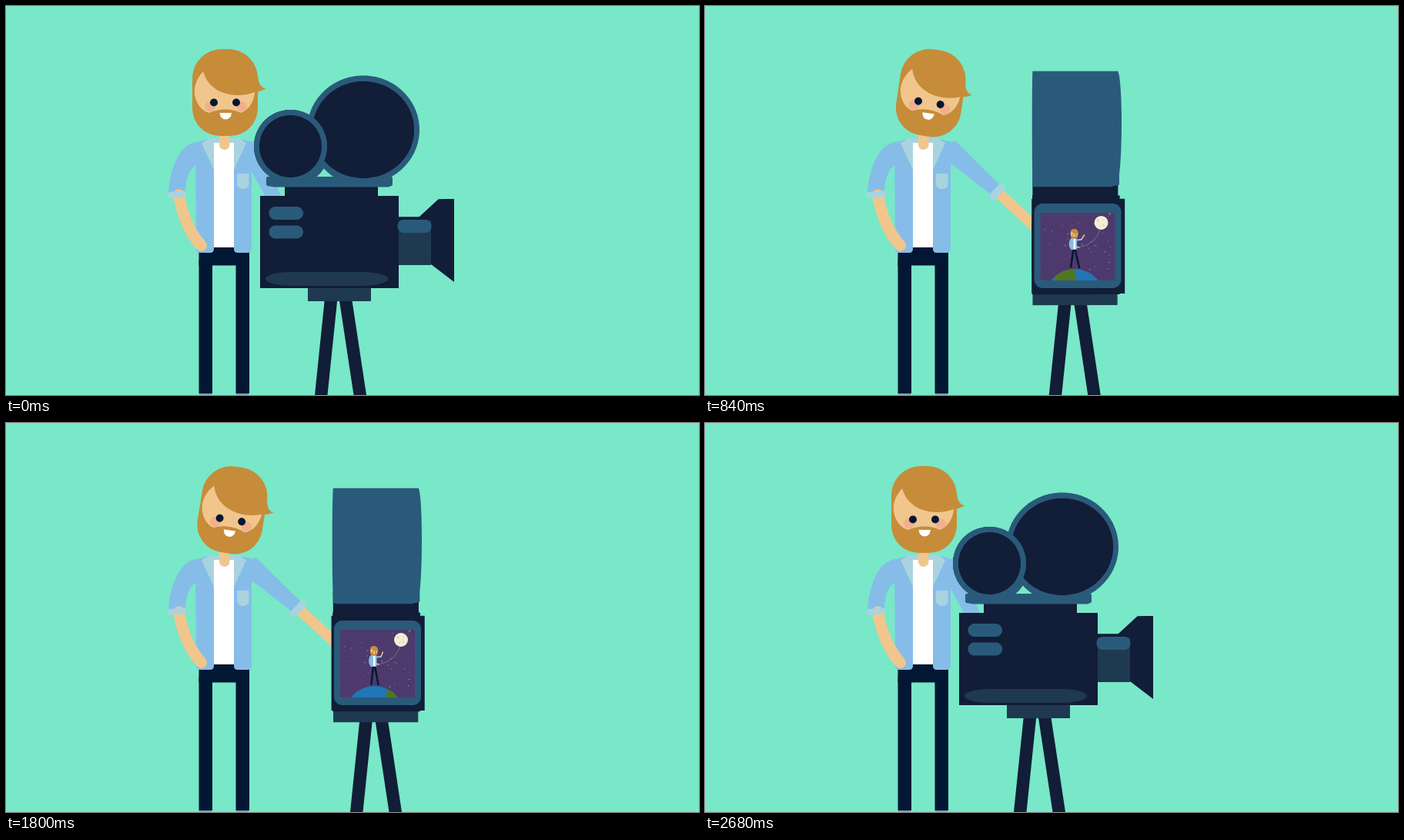
Write an HTML page with a canvas that moves like this. It is 900 px wide and 506 px high and loops after 2720 ms.

```html
<!DOCTYPE html>
<html lang="en">
<head>
<meta charset="utf-8">
<title>Film camera</title>
<style>
html, body { margin: 0; width: 100%; height: 100%; overflow: hidden; background: #78e8c8; }
canvas { display: block; width: 900px; height: 506px; }
</style>
</head>
<body>
<canvas id="stage" width="900" height="506"></canvas>
<script>
const ctx = document.getElementById('stage').getContext('2d');
const LOOP = 2720, TAU = Math.PI * 2;
const MINT = '#78e8c8', SKIN = '#f0c68d', HAIR = '#c68c39', DENIM = '#86bde8', PALE = '#a9d3df',
  NAVY = '#021733', DARK = '#121d38', BLUE = '#2a5a7a', TEAL = '#1f3a50';

const ease = (t, start, end) => {
  const x = Math.min(1, Math.max(0, (t - start) / (end - start)));
  return x * x * (3 - 2 * x);
};

// ---- 2D helpers ----
function shape(d, color) {
  ctx.fillStyle = color;
  ctx.fill(new Path2D(d));
}
function line(d, color, width, cap = 'round') {
  ctx.strokeStyle = color;
  ctx.lineWidth = width;
  ctx.lineCap = cap;
  ctx.stroke(new Path2D(d));
}
function rect(x, y, w, h, color, radii = 0) {
  ctx.fillStyle = color;
  ctx.beginPath();
  ctx.roundRect(x, y, w, h, radii);
  ctx.fill();
}
function oval(x, y, rx, ry, color) {
  ctx.fillStyle = color;
  ctx.beginPath();
  ctx.ellipse(x, y, rx, ry, 0, 0, TAU);
  ctx.fill();
}
function trace(points) {
  ctx.beginPath();
  points.forEach(p => ctx.lineTo(...p));
  ctx.closePath();
}
function polygon(points, color) {
  ctx.fillStyle = color;
  trace(points);
  ctx.fill();
}

// ---- 3D helpers: (x, y) as in the side view, w is depth ----
const ZOOM = 1250, PIVOT = 426, DEPTH = 106, CX = 450, CY = 253, FRONT = 582;
let cos = 1, sin = 0;
function project(x, y, w = 0) {
  const u = x - PIVOT;
  const k = ZOOM / (ZOOM - u * sin - w * cos);
  return [CX + (PIVOT + u * cos - w * sin - CX) * k, CY + (y - CY) * k];
}
// Point on the front plane, given by its place in the front view.
function front(x, y) {
  const k = ZOOM / (ZOOM - FRONT + PIVOT);
  return project(FRONT, CY + (y - CY) / k, PIVOT - CX - (x - CX) / k);
}
// Outline of a rectangle with elliptic corners.
function pill(x0, y0, x1, y1, rx, ry = rx) {
  return Array.from({ length: 64 }, (_, i) => {
    const a = (i + .5) / 64 * TAU, c = Math.cos(a), s = Math.sin(a);
    return [(x0 + x1) / 2 + Math.sign(c) * ((x1 - x0) / 2 - rx) + c * rx,
            (y0 + y1) / 2 + Math.sign(s) * ((y1 - y0) / 2 - ry) + s * ry];
  });
}
const disc = (x, y, rx, ry) => pill(x - rx, y - ry, x + rx, y + ry, rx, ry);
const box = (x0, y0, x1, y1) => [[x0, y0], [x1, y0], [x1, y1], [x0, y1]];

function hull(points) {
  const half = list => {
    const out = [];
    for (const p of list) {
      while (out.length > 1) {
        const [a, b] = out.slice(-2);
        if ((b[0] - a[0]) * (p[1] - a[1]) - (b[1] - a[1]) * (p[0] - a[0]) > 0) break;
        out.pop();
      }
      out.push(p);
    }
    return out.slice(0, -1);
  };
  points.sort((a, b) => a[0] - b[0] || a[1] - b[1]);
  return [...half(points), ...half([...points].reverse())];
}
function prism(points, color) {
  polygon(hull(points.flatMap(([x, y]) => [project(x, y), project(x, y, -DEPTH)])), color);
}
function sideFace(points, color) {
  if (ZOOM * cos > 24 * sin) polygon(points.map(p => project(...p)), color);
}

// ---- Man ----
function head(blink) {
  rect(242, 56, 85, 113, HAIR, [38, 38, 36, 36]);
  shape('M320 84L327 91Q328 106 338 107.5Q329 112 320 113Z', HAIR);
  shape('M256 85C247 95 244 105 245 115C247 128 255 137 264 139Q274 134.5 285 134.5Q296 134.5 305 139' +
    'C314 136 322 126 323 112Q313 116 302 116C280 116 262 106 256 85Z', SKIN);
  ctx.save();
  ctx.clip(new Path2D('M245 115C247 128 255 137 264 139Q285 130 305 139C314 136 322 126 323 112Z'));
  oval(265, 131, 7, 6.5, '#f0b08c');
  oval(306, 131, 7, 6.5, '#f0b08c');
  ctx.restore();
  if (blink > 0) [270, 299].forEach(x => oval(x, 125.5, 5, 5 * blink, NAVY));
  shape('M277.5 139H293Q292 147.5 285.2 147.5Q278.500 147.5 277.5 139Z', '#fff');
}

function reachingArm(turn) {
  ctx.save();
  ctx.translate(320, 187);
  ctx.rotate((66 - 23.5 * turn) * Math.PI / 180);
  line('M70 0H145', SKIN, 14);
  shape('M-6 -11Q0 -12.5 10 -11.5L80 -9V8L6 14L-8 12Z', DENIM);
  rect(76, -12.500, 9.5, 25, PALE, 2);
  ctx.restore();
}

function man(t, turn) {
  reachingArm(turn);
  rect(251, 503, 16, 4, '#7fa3b4');
  rect(299, 503, 16, 4, '#7fa3b4');
  rect(250.5, 314, 65.5, 23.5, NAVY);
  rect(250.5, 330, 17.5, 174, NAVY);
  rect(298.5, 330, 17.5, 174, NAVY);
  rect(268, 176, 30, 138, '#fff');
  shape('M250 177C228 176 213 208 211 243L233 242C233 226 239 210 248 207Z', DENIM);
  shape('M246 178L262 173L270 178V316Q270 321 265 321H252Q247 321 247 316Z', DENIM);
  shape('M296 178L304 173L325 178Q332 181 332 188L319 208V316Q319 321 314 321H301Q296 321 296 316Z', DENIM);
  shape('M254 178.500L264 172H277V178H270V213Z', PALE);
  shape('M312 178.500L303 172H290V178H296V213Z', PALE);
  rect(300, 218, 15.500, 20, PALE, [1, 1, 7, 7]);
  line('M224.500 246Q232 288 253.500 311.500', SKIN, 15);
  shape('M210 244Q210 242 212 242L232 240.500Q234 240.500 234 243V246Q234 248 232 248L212 250Q210 250 210 248Z', PALE);
  rect(277, 160, 13.500, 27, SKIN, 6.7);

  const tilt = ease(t, 660, 960) - ease(t, 1700, 1980);
  ctx.save();
  ctx.translate(285, 172);
  ctx.rotate(tilt * 13 * Math.PI / 180);
  ctx.translate(-285, -172);
  head(Math.min(1, Math.max(0, Math.abs(t - 2000) / 80 - .2)));
  ctx.restore();
}

// ---- Film on the screen, in front view coordinates ----
function film(t) {
  let seed = 7;
  const random = () => (seed = seed * 16807 % 2147483647) / 2147483647;
  for (let i = 0; i < 34; i++) {
    const color = ['#7a67a0', '#4fa3a5', '#b9a0c4', '#8d5a6e'][i % 4];
    oval(434 + random() * 97, 269 + random() * 80, .7, .7, color);
  }
  oval(524, 270.5, 1.3, 1.3, '#c0663c');
  line('M512 290Q506 310 484 314', '#8d83a0', .7);
  oval(513, 282, 9, 9, '#f5eed6');
  [[509, 279, 1.8], [516, 285, 1.6], [511, 286, 1.1], [516, 278, 1]].forEach(([x, y, r]) => oval(x, y, r, r, '#e3d9b8'));

  // Turning globe
  ctx.save();
  ctx.beginPath();
  ctx.arc(478.5, 380.5, 38.5, 0, TAU);
  ctx.clip();
  rect(430, 340, 100, 20, '#2276b8');
  for (const [angle, spread] of [[66, 24], [230, 20]]) {
    ctx.save();
    ctx.translate(478.5, 380.5);
    ctx.rotate((angle - t * .3) * Math.PI / 180);
    oval(0, -34, spread * .7, 8, '#4f7720');
    oval(5, -27, 8, 7, '#4f7720');
    ctx.restore();
  }
  ctx.restore();

  // Walker
  const step = 4 - 2.5 * Math.sin(t / LOOP * 3 * TAU);
  line(`M477 316L${478.5 - step} 340.500`, NAVY, 2.4, 'butt');
  line(`M479 316L${479.5 + step} 341`, NAVY, 2.4, 'butt');
  rect(473, 302, 8.5, 15, DENIM, 1.5);
  rect(477, 303, 2.5, 13, '#fff');
  line('M473.500 304Q471 309 473 314', DENIM, 2);
  line('M480 313L484 314', SKIN, 1.5);
  line('M481 304.500L486 304', DENIM, 2);
  line(`M487 304L${490 + Math.sin(t / 110)} 298`, SKIN, 1.5);
  ctx.save();
  ctx.translate(478, 303);
  ctx.scale(.113, .113);
  ctx.translate(-285, -172);
  head(1);
  ctx.restore();
}

function screen(t) {
  if (24 * cos + ZOOM * sin <= FRONT - PIVOT) return;
  const panel = (...r) => pill(...r).map(p => front(...p));
  polygon(panel(426, 257, 539, 367, 11), BLUE);
  const glass = panel(434, 269, 531, 357, 2);
  polygon(glass, '#4e396d');
  ctx.save();
  trace(glass);
  ctx.clip();
  const o = front(482, 313), a = front(522, 313), b = front(482, 353);
  ctx.transform((a[0] - o[0]) / 40, (a[1] - o[1]) / 40, (b[0] - o[0]) / 40, (b[1] - o[1]) / 40, ...o);
  ctx.translate(-482, -313);
  film(t);
  ctx.restore();
}

// ---- Camera ----
function camera(t, turn) {
  cos = Math.cos(turn * Math.PI / 2);
  sin = Math.sin(turn * Math.PI / 2);

  const slide = turn * 46;
  for (const [top, foot] of [[414, 401], [432.5, 451.5]])
    polygon([[top, 380], [top + 16.5, 380], [foot + 16.5, 506], [foot, 506]].map(([x, y]) => [x + slide, y]), DARK);

  prism(box(392, 366, 474, 384), TEAL);
  prism(box(362, 232, 483, 249), DARK);
  const big = disc(464, 161, 73, 70.5), small = disc(369.5, 182.5, 47.5, 47.5);
  prism(small.filter(p => p[1] < 230), BLUE);
  prism(big.filter(p => p[1] < 230), BLUE);
  sideFace(disc(464, 161, 66, 63), DARK);
  prism(pill(338, 222, 502, 234, 2), BLUE);
  sideFace(small.filter(p => p[1] < 230), BLUE);
  sideFace(disc(464, 161, 66, 63).filter(p => p[0] > 417), DARK);
  sideFace(small.filter(p => p[1] < 230), BLUE);
  sideFace(disc(369.5, 182.5, 40.5, 40.5), DARK);

  prism(box(330, 247, 510, 367), DARK);
  sideFace(pill(341.5, 261, 386, 278, 8.5), BLUE);
  sideFace(pill(341.5, 285.5, 386, 302.5, 8.5), BLUE);
  sideFace(pill(337, 346, 496, 364, 34, 9), TEAL);

  prism(box(510, 276, 552, 337), DARK);
  prism([[544, 276], [571, 251], [FRONT, 251], [FRONT, 359], [552, 336]], DARK);
  sideFace(box(510, 279, 552, 337), TEAL);
  sideFace(pill(508.5, 278, 552.5, 295, 8), BLUE);
  screen(t);
}

function frame(now) {
  const t = now % LOOP;
  const turn = ease(t, 0, 880) - ease(t, 1800, 2440);
  ctx.fillStyle = MINT;
  ctx.fillRect(0, 0, 900, 506);
  man(t, turn);
  camera(t, turn);
  requestAnimationFrame(frame);
}
requestAnimationFrame(frame);
</script>
</body>
</html>
```
